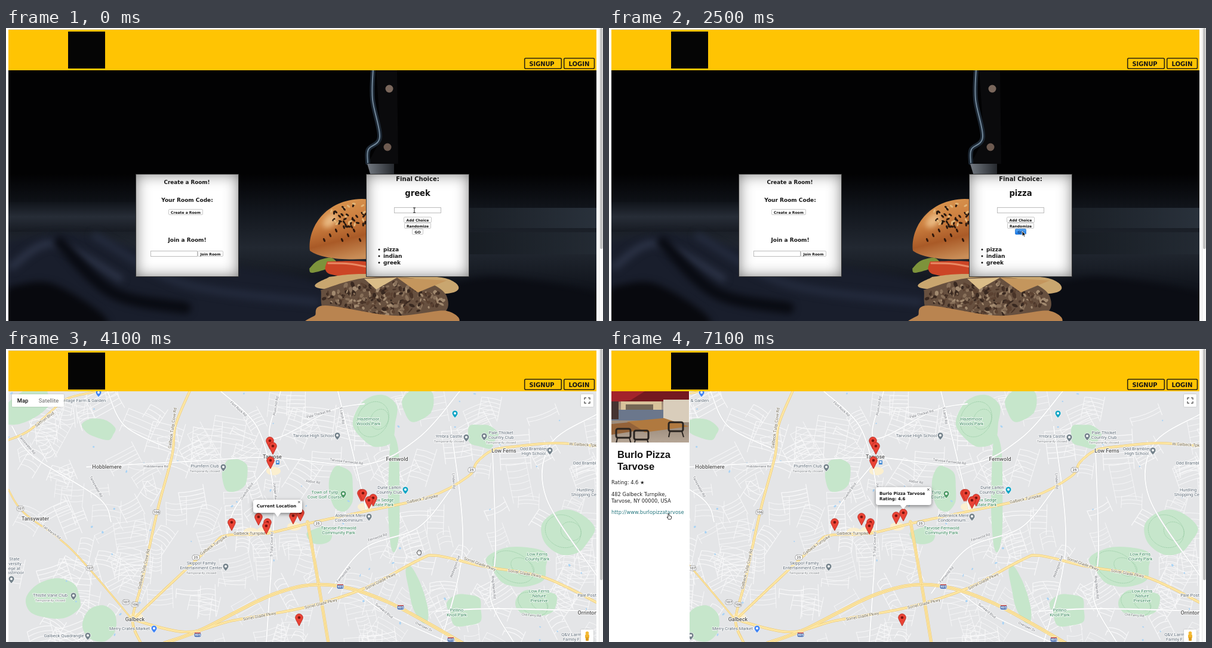
Recreate the animation shown at these times as an HTML page with a canvas. Size 1000 by 492 pixels, loop 7.2 s.

```html
<!DOCTYPE html>
<html lang="en">
<head>
<meta charset="utf-8">
<title>Room picker</title>
<style>
html, body { margin: 0; width: 100%; height: 100%; overflow: hidden; background: #fff; }
canvas { display: block; width: 1000px; height: 492px; }
</style>
</head>
<body>
<canvas id="stage" width="1000" height="492"></canvas>
<script>
const W = 1000, H = 492, LOOP = 7200;
const MARKER = '"DejaVu Sans", sans-serif';
const ROBOTO = 'Roboto, sans-serif';
const ARIAL = '"Liberation Sans", Arial, sans-serif';
const stage = document.getElementById('stage').getContext('2d');
let c = stage;

// ---------- helpers ----------
function seeded(s) {
  return () => (s = (s * 16807) % 2147483647) / 2147483647;
}
function box(x, y, w, h, fill) {
  c.fillStyle = fill;
  c.fillRect(x, y, w, h);
}
function round(x, y, w, h, r, fill, edge, lw = 1) {
  c.beginPath();
  c.roundRect(x, y, w, h, r);
  if (fill) { c.fillStyle = fill; c.fill(); }
  if (edge) { c.strokeStyle = edge; c.lineWidth = lw; c.stroke(); }
}
function dot(x, y, rx, fill, ry = rx, rot = 0) {
  c.beginPath();
  c.ellipse(x, y, rx, ry, rot, 0, 7);
  c.fillStyle = fill;
  c.fill();
}
function text(s, x, y, font, color = '#111', align = 'left') {
  c.font = font;
  c.textAlign = align;
  c.fillStyle = color;
  c.fillText(s, x, y);
}
const marker = (s, x, y, size, align = 'center', weight = 'bold', color = '#151515') =>
  text(s, x, y, `${weight} ${size}px ${MARKER}`, color, align);

function poly(p, fill) {
  c.beginPath();
  for (let i = 0; i < p.length; i += 2) c.lineTo(p[i], p[i + 1]);
  c.closePath();
  c.fillStyle = fill;
  c.fill();
}
// smooth curve through flat x,y pairs
function curve(p) {
  const n = p.length / 2, at = i => {
    i = Math.max(0, Math.min(n - 1, i));
    return [p[2 * i], p[2 * i + 1]];
  };
  c.beginPath();
  c.moveTo(p[0], p[1]);
  for (let i = 0; i < n - 1; i++) {
    const [a, b, d, e] = [at(i - 1), at(i), at(i + 1), at(i + 2)];
    c.bezierCurveTo(b[0] + (d[0] - a[0]) / 6, b[1] + (d[1] - a[1]) / 6,
      d[0] - (e[0] - b[0]) / 6, d[1] - (e[1] - b[1]) / 6, d[0], d[1]);
  }
}
function line(p, color, w) {
  curve(p);
  c.strokeStyle = color;
  c.lineWidth = w;
  c.stroke();
}
function blob(p, fill) {
  curve(p.concat(p.slice(0, 2)));
  c.fillStyle = fill;
  c.fill();
}
function ramp(x0, y0, x1, y1, ...stops) {
  const g = c.createLinearGradient(x0, y0, x1, y1);
  stops.forEach((s, i) => g.addColorStop(i / (stops.length - 1), s));
  return g;
}
function clip(x, y, w, h, draw) {
  c.save();
  c.beginPath();
  c.rect(x, y, w, h);
  c.clip();
  draw();
  c.restore();
}
function layer(draw) {
  const cv = document.createElement('canvas');
  cv.width = W;
  cv.height = H;
  c = cv.getContext('2d');
  c.lineCap = c.lineJoin = 'round';
  clip(4, 71, 985, 421, draw);
  c = stage;
  return cv;
}

// ---------- home view ----------
function table() {
  box(4, 71, 985, 421, '#020203');
  box(4, 245, 985, 247, ramp(0, 245, 0, 492, '#020203', '#12161d', '#222831', '#12161e', '#080a10'));
  box(730, 302, 260, 34, ramp(730, 0, 989, 0, '#171c22', '#29313b'));
  box(730, 343, 260, 37, ramp(730, 0, 989, 0, '#151a20', '#232a33'));
  box(4, 292, 230, 50, ramp(0, 292, 0, 342, '#10141a', '#272d37', '#171b23'));
  c.filter = 'blur(6px)';
  blob([-10, 360, 110, 345, 260, 380, 530, 430, 530, 510, -10, 510], '#191e2c');
  line([10, 400, 80, 362, 190, 420], '#2b3245', 13);
  line([90, 360, 180, 445, 300, 470], '#090b12', 20);
  line([150, 350, 300, 430, 520, 460], '#232a3c', 14);
  blob([4, 435, 80, 430, 170, 500, -10, 500], '#08090e');
  blob([740, 430, 830, 418, 1000, 448, 1000, 500, 730, 500], '#0b0d14');
  c.filter = 'none';
}
function knife() {
  poly([620, 71, 655, 71, 657, 228, 606, 228, 628, 186], '#0a0a0c');
  const spine = [615, 68, 614, 120, 626, 183, 607, 204, 606, 226];
  line(spine, '#1c2733', 8);
  line(spine, '#71879a', 2);
  poly([605, 228, 650, 228, 650, 248, 611, 248], ramp(605, 0, 650, 0, '#747a82', '#25282d'));
  dot(642, 102, 6.5, '#7a675c');
  dot(639, 200, 6.5, '#6d5a50');
}
function burger() {
  const rnd = seeded(71);
  c.beginPath();
  c.moveTo(509, 374);
  c.bezierCurveTo(505, 335, 535, 288, 596, 287);
  c.bezierCurveTo(660, 287, 700, 330, 720, 385);
  c.lineTo(600, 388);
  c.bezierCurveTo(560, 390, 525, 386, 509, 374);
  c.fillStyle = ramp(545, 290, 570, 390, '#d9954f', '#cd8040', '#a95a27', '#c98e58');
  c.fill();
  c.filter = 'blur(5px)';
  dot(543, 323, 15, '#e9b982', 9, -0.8);
  c.filter = 'none';
  for (let i = 0; i < 42; i++) {
    const x = 545 + rnd() * 58, y = 293 + rnd() * 42;
    dot(x, y, 3.2, i % 3 ? '#2b1a10' : '#e2b679', 1.6, rnd() * 3);
  }
  for (let i = 0; i < 7; i++) dot(533 + i * 10, 356 - (i % 3) * 8, 3.4, '#33190c', 1.7, 1.2);

  blob([508, 404, 522, 391, 545, 386, 552, 398, 514, 411], '#7d933b');
  blob([538, 392, 612, 394, 612, 420, 550, 415, 535, 406], '#cc4526');
  line([540, 395, 575, 396, 610, 402], '#e98964', 3);
  blob([541, 418, 600, 413, 735, 420, 738, 446, 530, 438], '#c9a66f');
  blob([527, 440, 600, 420, 690, 422, 738, 450, 715, 486, 550, 486], '#67503f');
  for (let i = 0; i < 260; i++) {
    const a = rnd() * 6.3, r = Math.sqrt(rnd());
    dot(632 + Math.cos(a) * r * 102, 455 + Math.sin(a) * r * 29, 1.5 + rnd() * 4,
      ['#493428', '#88705a', '#5b4232', '#a28a70', '#382820'][i % 5], 1 + rnd() * 2.5, rnd() * 3);
  }
  poly([600, 421, 655, 419, 620, 439], '#dbbd88');
  poly([655, 419, 738, 424, 690, 444], '#c4965d');
  blob([518, 482, 535, 466, 650, 483, 738, 475, 740, 500, 515, 500], '#b98450');
}

function card(x, y, s) {
  clip(x, y, s, s, () => {
    box(x, y, s, s, '#fff');
    c.shadowColor = '#777';
    c.shadowBlur = 24;
    c.beginPath();
    c.rect(x - 40, y - 40, s + 80, s + 80);
    c.rect(x, y, s, s);
    c.fillStyle = '#777';
    c.fill('evenodd');
  });
  c.strokeStyle = '#333';
  c.lineWidth = 1;
  c.strokeRect(x + .5, y + .5, s - 1, s - 1);
}
function button(s, x, y, w, pressed) {
  round(x + .5, y + .5, w - 1, 9, 1.5, pressed ? ramp(0, y, 0, y + 9, '#62aef3', '#1676e6') : '#fff',
    pressed ? '#2b78ce' : '#bbb', .8);
  marker(s, x + w / 2, y + 7.5, 6, 'center', 'bold', pressed ? '#164179' : '#111');
}
function input(x, y, focus) {
  if (focus) round(x - .5, y - .5, 80, 11, 1.5, null, '#6aa5e8', 2.2);
  box(x, y, 79, 10, '#fff');
  c.strokeStyle = focus ? '#3c80cf' : '#bcbcbc';
  c.lineWidth = 1;
  c.strokeRect(x + .5, y + .5, 78, 9);
}
function home(t) {
  c.drawImage(photo, 0, 0);
  card(217, 245, 173);
  marker('Create a Room!', 303, 262, 8.8);
  marker('Your Room Code:', 303.5, 292, 9);
  button('Create a Room', 272, 304, 58);
  marker('Join a Room!', 303.5, 359, 9);
  input(242, 374);
  button('Join Room', 321, 374, 43);

  card(603, 245, 173);
  marker('Final Choice:', 689.5, 256.5, 10);
  marker(t < 1700 ? 'greek' : 'pizza', 689.5, 282, 13.2);
  input(650, 301, t >= 400 && t < 1700);
  button('Add Choice', 666, 317, 47);
  button('Randomize', 667, 327, 45);
  button('GO', 680, 337, 19, t >= 2400);
  ['pizza', 'indian', 'greek'].forEach((s, i) => {
    dot(625, 372 + i * 11, 1.5, '#111');
    marker(s, 632, 374.5 + i * 11, 9, 'left');
  });
}

// ---------- map ----------
// park: centre, radii, tilt
const parks = [
  [36, 94, 46, 22, -.5], [156, 134, 30, 17, .4], [384, 212, 24, 27, 0], [622, 118, 36, 44, .2],
  [563, 232, 21, 36, 0], [650, 240, 11, 108, 0], [690, 414, 13, 46, -.3], [692, 94, 28, 28, .6],
  [798, 146, 26, 20, .4], [860, 366, 52, 34, 0], [942, 306, 44, 38, .5], [890, 428, 38, 24, 0],
  [769, 437, 31, 29, 0], [84, 421, 46, 32, -.2], [158, 460, 32, 28, 0], [526, 314, 24, 15, 0]
];
function park([x, y, rx, ry, tilt], i) {
  const rnd = seeded(i * 97 + 13), p = [];
  for (let a = 0; a < 6.2; a += .7) {
    const k = .85 + rnd() * .3, u = Math.cos(a) * rx * k, v = Math.sin(a) * ry * k;
    p.push(x + u * Math.cos(tilt) - v * Math.sin(tilt), y + u * Math.sin(tilt) + v * Math.cos(tilt));
  }
  blob(p, '#c6e6cb');
}

const turnpike = [212, 455, 275, 395, 345, 330, 370, 313, 435, 310, 510, 292, 600, 273, 710, 248, 774, 214,
  789, 190, 815, 170, 850, 164, 920, 158, 989, 163];
const parkway = [205, 452, 300, 475, 380, 456, 500, 434, 600, 402, 690, 355, 722, 347, 800, 365, 900, 383, 992, 427];
const express = [265, 494, 330, 470, 450, 411, 540, 396, 640, 425, 765, 494];
const south = [505, 290, 521, 380, 540, 494];
const west = [308, 70, 284, 128, 278, 180, 254, 270, 228, 390, 212, 455, 226, 494];
const boulevard = [4, 153, 40, 136, 90, 92, 112, 80, 160, 70];
const marsh = [4, 236, 30, 275, 110, 337, 212, 455];
const highways = [[boulevard, 2.4], [west, 3], [marsh, 1.6], [turnpike, 3], [parkway, 3.2], [express, 4.6], [south, 4]];
const avenues = [
  [360, 71, 420, 130, 446, 220, 448, 300, 436, 494], [460, 71, 445, 150, 545, 103, 600, 92],
  [556, 71, 580, 170, 604, 272], [135, 198, 320, 188, 445, 182, 600, 194, 690, 150, 760, 71],
  [370, 312, 385, 265, 445, 190], [10, 130, 45, 180, 155, 250, 176, 290],
  [540, 410, 600, 335, 690, 300, 745, 236], [745, 130, 765, 330, 728, 494],
  [815, 172, 820, 340, 812, 420, 850, 492], [580, 402, 640, 446, 740, 492],
  [720, 440, 820, 436, 989, 440], [989, 110, 912, 160, 905, 250, 989, 380], [170, 71, 200, 130, 280, 170]
];
const pins = [442, 154, 447, 163, 443, 187, 378, 291, 423, 282, 438, 291, 436, 297, 481, 280, 493, 275,
  595, 242, 598, 242, 615, 250, 608, 254, 491, 451];

// labels: text with | between lines, x, y, optional angle
const CLOSED = '|*Temporarily closed';
const towns = [['Hobblemere', 169, 201], ['Tansywater', 49, 288], ['Fernwold', 655, 188], ['Low Ferns', 834, 174],
  ['Galbeck', 216, 457], ['Orrinton', 974, 446], ['Tarvose', 446, 184]];
const greens = [['Hazelmoor|Woods Park', 607, 120], ['Town of Tulip|Cove Golf Course', 534, 243],
  ['Fox Sedge|State Park', 632, 256], ['Tarvose-Fernwold|Community Park', 557, 303], ['Low Ferns|County Park', 890, 347],
  ['Low Ferns|Nature|Preserve', 893, 409], ['Pellino|Knoll Park', 755, 441]];
const places = [['Tarvose High School', 515, 148], ['Plumfern Club' + CLOSED, 333, 199], ['Ymbra Castle' + CLOSED, 742, 149],
  ['Pale Thicket|Country Club' + CLOSED, 829, 143], ['Odd Brambley|High School', 884, 170],
  ['Alderwick Mere|Condominium...', 577, 282], ['Skippo! Family|Entertainment Center' + CLOSED, 327, 362],
  ['Thistle Vane Club' + CLOSED, 74, 416], ['Galbeck Quadrangle', 97, 484], ['ntage Farm & Garden', 132, 89],
  ['Dune Larkin|Country Club', 642, 235], ['Merry Crates Market', 207, 472], ['Odd Brambl', 969, 194],
  ['Hurdling|Shopping Cen', 970, 239], ['Pale Post', 973, 416], ['Q&V Larm|Family F', 947, 482],
  ['State|iversity|ege at|Eastmoor', 14, 355]];
const roads = [['Galbeck Turnpike', 349, 331, -35], ['Galbeck Turnpike', 408, 312, 0], ['Galbeck Turnpike', 698, 254, -12],
  ['W Galbeck Tpke', 968, 163, 3], ['Saffron Blvd', 66, 120, -37], ['Galbeck Tulip Cove Rd', 281, 133, -82],
  ['Galbeck Tulip Cove Rd', 233, 370, -77], ['Sorrel Glade Pkwy', 425, 451, -11], ['Sorrel Glade Pkwy', 528, 430, -14],
  ['Sorrel Glade Pkwy', 628, 392, -27], ['Sorrel Glade Pkwy', 793, 363, 20], ['Sorrel Glade Pkwy', 868, 379, 10]];
const lanes = [['Flint Rock Rd', 388, 102, 42], ['Plum Hill Rd', 454, 96, -80], ['Pale Thicket Rd', 524, 111, -15],
  ['S Larch Rd', 561, 112, 82], ['Tarvose Fernwold Rd', 570, 191, 7], ['Hobblemere Rd', 251, 199, 0],
  ['Abbot Rd', 514, 225, 8], ['Overhill Blvd', 405, 240, -55], ['Juniper Ave', 449, 240, 86],
  ['S Tulip Cove Rd', 447, 328, -88], ['Tansywater Rd', 34, 162, 50], ['Tansywater Rd', 149, 232, 62],
  ['Fernwold Rd', 623, 318, -18], ['Fernwold Rd', 567, 380, -50], ['Linden Rd', 748, 222, 88],
  ['Ring Marsh Rd', 815, 400, 85], ['Wellington Ave', 754, 366, -70], ['Sunward Blvd', 632, 441, 40],
  ['Overseer Dr', 699, 468, 27], ['Old Ferry Rd', 880, 449, 5], ['Tall Marsh Rd', 75, 309, 36]];
const shields = [['25', 522, 293], ['25', 318, 350], ['25', 780, 203], ['106', 252, 274], ['107', 24, 268], ['107', 140, 368],
  ['107', 201, 425], ['106', 216, 429], ['495', 321, 480], ['495', 560, 399], ['495', 661, 434], ['495', 745, 488]];
const GREY = '#74828b', TEAL = '#4e9b66', BLUE = '#4285f4', CYAN = '#12a4c4';
const spots = [[555, 145, GREY], [565, 243, TEAL], [669, 236, CYAN], [608, 281, GREY], [771, 148, GREY], [801, 146, GREY],
  [911, 170, GREY], [364, 198, GREY], [368, 365, GREY], [113, 414, GREY], [137, 481, GREY], [248, 469, BLUE], [752, 108, CYAN],
  [155, 73, BLUE], [9, 386, GREY]];

function labels(list, size, color, weight = 400) {
  c.textAlign = 'center';
  c.strokeStyle = 'rgba(255,255,255,.85)';
  c.lineWidth = 1.8;
  for (const [s, x, y, deg = 0] of list) {
    c.save();
    c.translate(x, y);
    c.rotate(deg * Math.PI / 180);
    s.split('|').forEach((row, i) => {
      const small = row[0] === '*';
      if (small) row = row.slice(1);
      c.font = `${weight} ${small ? 6 : size}px ${ROBOTO}`;
      c.fillStyle = small ? '#85898d' : color;
      c.strokeText(row, 0, i * 7.8);
      c.fillText(row, 0, i * 7.8);
    });
    c.restore();
  }
}
// clusters of parallel side streets
function streets() {
  const rnd = seeded(2024);
  c.strokeStyle = '#f9f9fa';
  for (let k = 0; k < 210; k++) {
    c.save();
    c.translate(4 + rnd() * 985, 71 + rnd() * 421);
    c.rotate((rnd() - .5) * 1.2);
    c.lineWidth = .7 + rnd() * .5;
    const n = 2 + rnd() * 5 | 0, len = 16 + rnd() * 38, gap = 6 + rnd() * 5, bend = (rnd() - .5) * 14;
    c.beginPath();
    for (let i = 0; i < n; i++) {
      c.moveTo(0, i * gap);
      c.quadraticCurveTo(len / 2, i * gap + bend, len, i * gap);
    }
    c.moveTo(0, 0);
    c.lineTo(0, n * gap);
    c.moveTo(len, -gap);
    c.lineTo(len, n * gap);
    c.stroke();
    c.restore();
  }
}
function teardrop(x, y, r, tip, fill, edge) {
  c.beginPath();
  c.arc(x, y, r, Math.PI * .9, Math.PI * .1);
  c.quadraticCurveTo(x + r * .75, y + r * .8, x, y + tip);
  c.quadraticCurveTo(x - r * .75, y + r * .8, x - r * .95, y + r * .31);
  c.fillStyle = fill;
  c.fill();
  c.strokeStyle = edge;
  c.lineWidth = .8;
  c.stroke();
}
function control(x, y, w) {
  c.save();
  c.shadowColor = 'rgba(0,0,0,.3)';
  c.shadowBlur = 2;
  round(x, y, w, 21, 1, '#fff');
  c.restore();
}
function controls() {
  control(10, 76, 87);
  text('Map', 28, 90, `500 9.3px ${ROBOTO}`, '#111', 'center');
  text('Satellite', 71.5, 90, `400 9.3px ${ROBOTO}`, '#666', 'center');
  control(963, 76, 21);
  c.strokeStyle = '#666';
  c.lineWidth = 1.5;
  c.lineCap = 'butt';
  c.beginPath();
  for (const sx of [-1, 1]) for (const sy of [-1, 1]) {
    c.moveTo(973.5 + sx * 4.5, 86.5 + sy * 1.5);
    c.lineTo(973.5 + sx * 4.5, 86.5 + sy * 4.5);
    c.lineTo(973.5 + sx * 1.5, 86.5 + sy * 4.5);
  }
  c.stroke();
  control(963, 471, 21);
  round(970, 479, 7, 7, 2, '#f2b52c');
  round(971, 484, 5, 6, 1, '#dc9d21');
  dot(973.5, 477, 2.8, '#f5ba35');
}
function mapBase() {
  const rnd = seeded(9);
  box(4, 71, 985, 421, '#e4e5e7');
  streets();
  parks.forEach(park);
  // trails
  c.setLineDash([1.5, 1.5]);
  for (const i of [3, 9, 10, 11]) {
    const [x, y, rx, ry] = parks[i];
    for (const k of [.4, .7]) {
      c.beginPath();
      c.ellipse(x + rx * (.5 - k), y, rx * k, ry * k, .5, 0, 7);
      c.strokeStyle = '#9fd0aa';
      c.lineWidth = .9;
      c.stroke();
    }
  }
  c.setLineDash([]);
  for (let i = 0; i < 55; i++) dot(4 + rnd() * 985, 71 + rnd() * 421, 1 + rnd() * 1.6, '#a9d3f5', .8 + rnd(), rnd() * 3);
  for (const [x, y] of [[410, 307], [433, 305], [483, 298], [448, 205], [601, 265], [218, 450]]) dot(x, y, 12, '#fbefcf', 7);
  avenues.forEach(p => line(p, '#d6d8db', 2.5));
  avenues.forEach(p => line(p, '#fff', 1.8));
  highways.forEach(([p, w]) => line(p, '#efc564', w + 1));
  highways.forEach(([p, w]) => line(p, '#fce6a4', w));
  line(express, '#f2ce7b', .8);
  line(south, '#f2ce7b', .8);

  labels(lanes, 6, '#707379');
  labels(roads, 7, '#6f6650');
  labels(greens, 7.5, '#35865a');
  labels(places, 7.5, '#5d6a76');
  labels(towns, 9, '#555', 500);
  for (const [s, x, y] of shields) {
    const blue = s === '495';
    round(x - 6, y - 4, 12, 8, 3, blue ? '#4c72b4' : '#fff', blue ? '#fff' : '#8d8d8d', .7);
    if (blue) box(x - 5, y - 4, 10, 1.5, '#d6564d');
    text(s, x, y + 2.2, `500 6px ${ROBOTO}`, blue ? '#fff' : '#555', 'center');
  }
  for (const [x, y, col] of spots) {
    teardrop(x, y, 5, 8, col, '#fff');
    dot(x, y, 2, '#fff');
  }
  round(452, 187, 6, 7, 1, '#4d91d8');
  box(453.5, 188.5, 3, 2.5, '#fff');
  controls();
}
function bubble(x, y, w, h, tipX, lines) {
  c.save();
  c.shadowColor = 'rgba(0,0,0,.45)';
  c.shadowBlur = 6;
  c.shadowOffsetY = 2;
  round(x, y, w, h, 4, '#fff');
  c.restore();
  poly([tipX - 6, y + h - 1, tipX + 6, y + h - 1, tipX, y + h + 7], '#fff');
  lines.forEach((s, i) => marker(s, x + 6, y + 13 + i * 8.5, 7, 'left'));
  text('×', x + w - 5, y + 7, `9px ${ROBOTO}`, '#555', 'center');
}
function panel() {
  box(4, 71, 131, 421, '#fff');
  clip(4, 71, 130, 86, () => {
    box(4, 71, 130, 86, ramp(0, 71, 0, 157, '#8d7665', '#a7937d', '#9b8b7c', '#b6a696'));
    box(4, 71, 130, 17, '#751920');
    poly([4, 71, 60, 71, 36, 86, 4, 90], '#a3232b');
    box(20, 88, 68, 16, '#d8c29a');
    box(28, 93, 46, 9, '#756755');
    box(4, 102, 87, 18, '#6b778c');
    box(91, 85, 43, 38, '#d9cdbb');
    box(4, 88, 12, 30, '#453331');
    poly([30, 122, 92, 116, 134, 130, 60, 140], '#b0793f');
    poly([4, 126, 34, 123, 55, 136, 4, 144], '#936239');
    for (const [x, y] of [[12, 134], [100, 123], [42, 137]]) {
      round(x, y, 24, 15, 3, null, '#29231f', 3);
      line([x + 2, y + 15, x, y + 25], '#29231f', 2);
      line([x + 22, y + 15, x + 25, y + 25], '#29231f', 2);
    }
  });
  text('Burlo Pizza', 14, 183, `bold 16.5px ${ARIAL}`);
  text('Tarvose', 14, 203, `bold 16.5px ${ARIAL}`);
  const note = (s, y, col) => marker(s, 4, y, 8.3, 'left', 'normal', col);
  note('Rating: 4.6 ★', 227, '#222');
  note('482 Galbeck Turnpike,', 247, '#222');
  note('Tarvose, NY 00000, USA', 257.5, '#222');
  clip(4, 262, 130, 24, () => note('http://www.burlopizzatarvose', 276.5, '#26777f'));
}
function mapView(t) {
  c.drawImage(mapLayer, 0, 0);
  if (t >= 3400) {
    for (let i = 0; i < pins.length; i += 2) {
      teardrop(pins[i], pins[i + 1], 6.3, 14, '#ea4335', '#b3261e');
      dot(pins[i], pins[i + 1], 2.3, '#7b150f');
    }
    if (t < 5800) bubble(414, 253, 82, 22, 455, ['Current Location']);
    else bubble(447, 232, 93, 30, 493, ['Burlo Pizza Tarvose', 'Rating: 4.6']);
  }
  if (t >= 5800) panel();
}

// ---------- frame ----------
function header(t) {
  box(0, 0, W, H, '#fff');
  box(4, 2, 985, 1, '#d9d3bd');
  box(4, 3, 985, 68, '#ffc403');
  box(104, 6, 62, 62, '#050505');
  round(868.7, 50.7, 61.6, 17.6, 2, null, '#2a2410', 1.6);
  round(934.7, 50.7, 50.8, 17.6, 2, null, '#2a2410', 1.6);
  marker('SIGNUP', 897.5, 63.5, 9.8);
  marker('LOGIN', 960, 63.5, 10.1);
  box(993, 0, 7, H, '#fafafa');
  box(993, 0, 1, H, '#e6e6e6');
  round(995, 0, 4.5, t < 2700 ? 371 : 388, 2, '#c1c1c1');
}
function statusBar() {
  round(0, 481, 333, 14, [0, 3, 0, 0], '#2e3034');
  text('Waiting for pick-our-plate.herokuapp.com...', 3, 489, `6.5px ${ARIAL}`, '#b9bbbe');
}

// cursor stops: time, x, y
const moves = [[0, 684, 306], [400, 684, 306], [1200, 702, 331], [1800, 702, 331], [2300, 692, 341],
  [4500, 692, 342], [5300, 506, 292], [5600, 493, 277], [5900, 493, 277], [6800, 101, 281], [LOOP, 101, 281]];
function place(t) {
  const i = moves.findIndex(m => m[0] > t), [t0, x0, y0] = moves[i - 1], [t1, x1, y1] = moves[i];
  const k = (t - t0) / (t1 - t0), e = k * k * (3 - 2 * k);
  return [x0 + (x1 - x0) * e, y0 + (y1 - y0) * e];
}
function shape(p, fill, edge) {
  poly(p, fill);
  c.strokeStyle = edge;
  c.lineWidth = .9;
  c.stroke();
}
function cursor(t) {
  const [x, y] = place(t);
  c.save();
  c.translate(x, y);
  c.lineJoin = 'round';
  if (t < 2700) {
    if (y < 312) {
      box(-.5, -4, 1, 8, '#222');
      box(-2, -4.5, 4, 1, '#222');
      box(-2, 3.5, 4, 1, '#222');
    } else shape([0, 0, 0, 8.5, 2, 6.8, 3.5, 10, 5, 9.2, 3.6, 6.3, 6.2, 6], '#111', '#fff');
  } else if (t >= 5600 && (x > 485 || x < 134)) {
    shape([-2, -4.5, -.5, -4.5, 0, -1, 3.5, 0, 3.5, 3, 2.5, 5, -1.5, 5, -4, 1, -2, 1.5], '#fff', '#222');
  } else {
    shape([-2.5, -3, -1, -4, 1, -4, 3, -3, 3.5, 0, 2.5, 4, -1.5, 4, -4, 0, -3, -.5], '#fff', '#333');
    box(-1, -3.5, .6, 3, '#777');
    box(1, -3.5, .6, 3, '#777');
  }
  c.restore();
}

const photo = layer(() => { table(); knife(); burger(); });
const mapLayer = layer(mapBase);
const start = performance.now();
function frame(now) {
  const t = Math.floor(Math.max(0, now - start) % LOOP / 100) * 100;
  header(t);
  if (t < 2700) home(t);
  else if (t < 3300) {
    box(4, 71, 985, 421, '#dfdeda');
    if (t < 3200) statusBar();
  } else mapView(t);
  cursor(t);
  requestAnimationFrame(frame);
}
frame(start);
</script>
</body>
</html>
```
